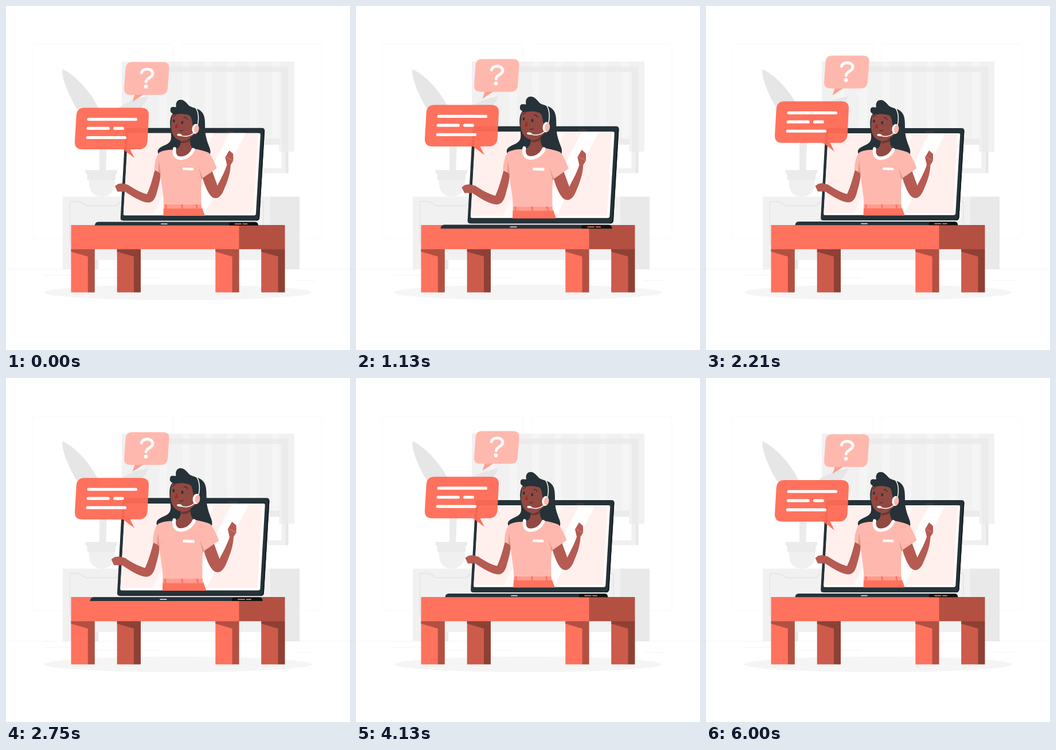
Write an HTML page that moves like this. It is 600x600 px and loops after 6.04 s.

```html
<!DOCTYPE html>
<html lang="en">
<head>
<meta charset="utf-8">
<title>Online support</title>
<style>
  html, body { margin: 0; width: 100%; height: 100%; overflow: hidden; background: #fff; }
  svg { display: block; width: 100vw; height: 100vh; }
  .line { fill: none; stroke-linecap: round; stroke-linejoin: round; }
</style>
</head>
<body>
<svg viewBox="0 0 600 600">
  <!-- room -->
  <g class="line" stroke="#f8f8f8">
    <rect x="46" y="66.500" width="245.500" height="339" rx="5"/>
    <rect x="306" y="66.500" width="245" height="339" rx="5"/>
    <path stroke="#f4f4f4" d="M0 459.200H600M65 469.500H117M160 474.300H271M502 478.500H538"/>
  </g>

  <!-- window and blind -->
  <path fill="#f0f0f0" d="M218 105.500H488V291.500H218Z"/>
  <path fill="#e6e6e6" d="M488 105.500H492.500V291.500H488Z"/>
  <path fill="#fff" d="M222 115H480.500V283H222Z"/>
  <path fill="#f5f5f5" d="M202 97H503V254H476.500V242H202Z"/>
  <g id="slats" fill="#f1f1f1"></g>
  <path fill="#e9e9e9" opacity=".7" d="M218 105.500H492.500V254H488V115H218ZM280 231H477V242H280Z"/>
  <path fill="#ebebeb" d="M481 115H488V254H481Z"/>

  <!-- plant -->
  <g fill="#e6e6e6">
    <path d="M98.500 110.500C96 123 109 158 129 188L166 190C155 157 122 120 98.500 110.500Z"/>
    <path d="M248 158C228 160 205 169 187 185C174 199 164 224 163 250L175 250C177 232 184 214 196 205C222 196 240 178 248 158Z"/>
  </g>
  <path fill="#ebebeb" d="M163 240H176L174 290H163Z"/>
  <path fill="#f0f0f0" d="M144 298H190V309C190 324 180 332.500 167 332.500S145 324 145 309Z"/>
  <path fill="#ebebeb" d="M138.500 286H194V291Q190 294 191 298Q193 302 189 304H144Q140 302 142 298Q143 294 138.500 291Z"/>

  <!-- cabinet -->
  <path fill="#f1f1f1" d="M99 332.500H462V443H161V459H99Z"/>
  <path fill="#e9e9e9" d="M461 332.500H512V459H461ZM155 443H161V459H155Z"/>
  <g class="line" stroke="#e6e6e6" stroke-width="1.800">
    <path d="M111.500 411V341H126C134 341 134 348.500 142 348.500H188C196 348.500 196 341 204 341H276V411Z"/>
    <path d="M288 341H449V411"/>
  </g>

  <ellipse cx="300" cy="499.500" rx="233" ry="13.500" fill="#f5f5f5"/>

  <!-- table -->
  <g id="legs"></g>
  <path fill="#ff725e" d="M113.500 382H407V424.300H113.500Z"/>
  <path fill="#b35042" d="M406.500 382H486.500V424.300H406.500Z"/>

  <g id="call">
    <!-- laptop -->
    <path fill="#263238" d="M162 376H434Q439 376 439.500 382.300H155.500Q156 376 162 376Z"/>
    <path fill="#111" d="M392 376.500H434Q438.500 377 439 382.300H389Q387 377 392 376.500Z"/>
    <path class="line" stroke="#ff725e" stroke-width="1.700" d="M399 379.600H409.500M413 379.600H420"/>
    <path class="line" stroke="#d5d8d9" stroke-width="1.700" d="M271 379.600H281"/>
    <path fill="#263238" d="M213 213H446Q450.700 213 450.500 218L441.500 369Q441 374 436 374H205Q200 374 200.200 369L208.500 218Q209 213 213 213Z"/>
    <path fill="none" stroke="#10181c" stroke-width="1.600" d="M449.700 217L440.700 369Q440.300 373 436 373.200"/>
    <path fill="#3a383b" d="M384 218H399L397 222H382Z"/>
    <path fill="#fff" d="M215 222H441Q443.300 222 443.200 225L435.300 362Q435 364.800 432 364.800H207Q205 364.800 205.200 362L213 224Q213.200 222 215 222Z"/>
    <path fill="#fff0ee" d="M213.500 222H439L431 361H205.500Z"/>
    <path fill="#fff" opacity=".7" d="M328 222H362L292 361H258Z"/>
    <path fill="#fff" d="M389 222H417L347 361H319Z"/>

    <!-- hair -->
    <path fill="#263238" d="M287 181C287 176 291 176 297 177C295 168 300 163.500 305 164C311 164 315 170 320 175C328 179 335 179 340 184C347 190 347 200 347 213C347 227 351 237 354 245C357 252 357 258 354 260H268C264 257 264 252 267 249C273 243 283 243 287 235C289 230 288 225 287 215C285 202 287 192 291 188C288 187 286 184 287 181Z"/>

    <!-- arms -->
    <g fill="#b55b52">
      <path d="M260 285C256 301 251 318 246 328C235 325 224 319 213 311.500L203 309L196 310L190.500 314L195 323.500H208C220 331 234 341 247 342.500C256 343 260 336 262.500 328C266 315 270 303 270 289Z"/>
      <path d="M342 297C346 312 353 330 361 334C369 337.500 375 331 379 322C386 306 391 292 391.500 277L396 270V258L389 252L382 264L385 277C380 292 374 302 368.500 313L359 287Z"/>
    </g>
    <path class="line" stroke="#e2a39a" stroke-width=".7" d="M384 263.500L396 270"/>

    <!-- body -->
    <path fill="#ff725e" d="M275 352H342L346.800 365.500H274.500Z"/>
    <path fill="#ff9c8e" d="M275.300 345.500H340.500L341.500 353H275Z"/>
    <path stroke="#ff725e" stroke-width="2.600" d="M279 345.500L279.500 353M306.500 345.500L307.500 353M331.500 345.500L333 353"/>
    <path fill="#ffb8ae" d="M268 255Q280 250 294 251L328 249Q345 252 353.500 256C360 264 364 274 367.500 283L343 300L341 302C340 318 340 332 340.500 345.500H275.300C275 328 271 310 269 291L258.800 286C259 274 262 261 268 255Z"/>
    <path fill="#de9990" d="M267 270L270 293L265.500 289ZM336 282L343 299.500L341 303Z"/>
    <path fill="#914942" d="M305 228H321C320 239 322 244 326 249C322 260 314 263 305 263C297 263 295 257 295 250C303 249 306 241 305 228Z"/>
    <path class="line" stroke="#fff" stroke-width="5.800" stroke-linecap="butt" d="M294 249C292 261 298 265.500 304.500 265.500C314 265.500 323 259 326.500 250.500"/>
    <rect x="308.300" y="281.800" width="19" height="4.500" rx=".8" fill="#fff" transform="rotate(2 318 284)"/>

    <!-- face -->
    <path fill="#914942" d="M290 190C286.500 206 287 221 294 229C301 237 313 237.500 321 230L332 221L335 200L325 186Z"/>
    <path fill="#6d3530" d="M306 236Q315 236 321 230L320.500 236Q314 240 306 239Z"/>
    <path fill="#263238" d="M290 187C301 188 312 188 320 191C325 196 324 203 326 209L337 212L337 184L320 176L297 176Z"/>
    <g fill="#263238">
      <ellipse cx="293" cy="200.800" rx="1.700" ry="2.700"/>
      <ellipse cx="307.300" cy="203.500" rx="1.700" ry="2.700"/>
    </g>
    <path class="line" stroke="#263238" stroke-width="1.200" d="M291.500 193.500Q293.500 191 296 191M310 194.500Q314 194 316 198"/>
    <path fill="#a02724" d="M298.500 204L294.500 212Q297 214 299.500 212.500Z"/>
    <path class="line" stroke="#4c2320" stroke-width="1" d="M302.500 217.800Q306 219 309 216.500"/>

    <!-- headset -->
    <g class="line" stroke="#fff">
      <path stroke-width="1.500" d="M330 177.500C335 183 337 195 334 208"/>
      <path stroke-width="1.400" d="M328 221C321 228 311 229 304 225.500"/>
    </g>
    <ellipse cx="302.500" cy="225" rx="4.200" ry="2" fill="#fff" transform="rotate(8 302 225)"/>
    <ellipse cx="330.300" cy="214.500" rx="5.800" ry="8.600" fill="#fff" transform="rotate(8 330 214)"/>
    <ellipse cx="332.300" cy="214.800" rx="4.200" ry="7" fill="#ffb8ae" transform="rotate(8 332 214)"/>
  </g>

  <g id="chat">
    <path fill="#ff9e90" d="M225 154L220.500 167.300L241 154Z"/>
    <path fill="#ffb8ae" d="M219.500 98.200H273.500Q285 98.200 284.500 109L282 144.500Q281 155.300 270.500 155.300H216.500Q205.500 155.300 206 144.500L208.500 109Q209.500 98.200 219.500 98.200Z"/>
    <path class="line" stroke="#fff" stroke-width="5" d="M236.300 117C237.500 112 242.500 110.200 247.500 110.600C254 111.200 257.500 116 255.200 121C252.500 126 245 126.500 244.300 132.500"/>
    <circle cx="244" cy="140.800" r="3.400" fill="#fff"/>
    <path fill="#ff6b56" opacity=".95" d="M137 178H235.500Q249.500 178 249 191L246.700 237Q245.500 248.500 235 250.300L216.500 250.500L224 265.500L204 250.500H133Q119.500 250.500 120 237L122.700 191Q124 178 137 178Z"/>
    <path class="line" stroke="#fff" stroke-width="5.200" d="M144.200 198H226.500M143.300 213.800H178.300M189.600 213.800H203.300M142.300 229.900H207.500"/>
  </g>
</svg>
<script>
const el = id => document.getElementById(id);
const LOOP = 6040, CYCLE = 6000, LEAD = 25;

const slats = [202, 241, 281, 320, 359, 398, 437];
el('slats').innerHTML = slats.map(x => `<path d="M${x} 97h26.500V242h-26.500Z"/>`).join('')
  + '<path d="M476.500 97H503V254H476.500Z"/>';

const leg = (x, front, side) => `
  <path fill="${front}" d="M${x} 424h30v75.500h-30Z"/>
  <path fill="${side}" d="M${x} 424h41.300v75.500h-12V437L${x} 428.500Z"/>`;
el('legs').innerHTML =
  leg(193.700, '#cc5b4b', '#8f4035') + leg(445.200, '#cc5b4b', '#8f4035') +
  leg(113.500, '#ff725e', '#b35042') + leg(365.300, '#ff725e', '#b35042');

// [time, value] steps with straight runs between them
const pulse = [[0, 1], [600, 1.1], [1800, 1], [2400, 1], [3000, 1.1], [3600, 1], [CYCLE, 1]];
const bob = [[0, 0], [750, -12], [1500, 0]];

function at(steps, t) {
  const i = Math.max(1, steps.findIndex(s => s[0] >= t));
  const [t0, a] = steps[i - 1], [t1, b] = steps[i];
  return a + (b - a) * (t - t0) / (t1 - t0);
}

function draw(now) {
  const t = Math.min(CYCLE, LEAD + (now % LOOP) * (1 - LEAD / CYCLE));
  const s = at(pulse, t);
  el('call').setAttribute('transform', `translate(303 273) scale(${s}) translate(-303 -273)`);
  el('chat').setAttribute('transform', `translate(0 ${at(bob, t % 1500)})`);
}

const start = performance.now();
function tick() {
  draw(performance.now() - start);
  requestAnimationFrame(tick);
}
tick();
</script>
</body>
</html>
```
